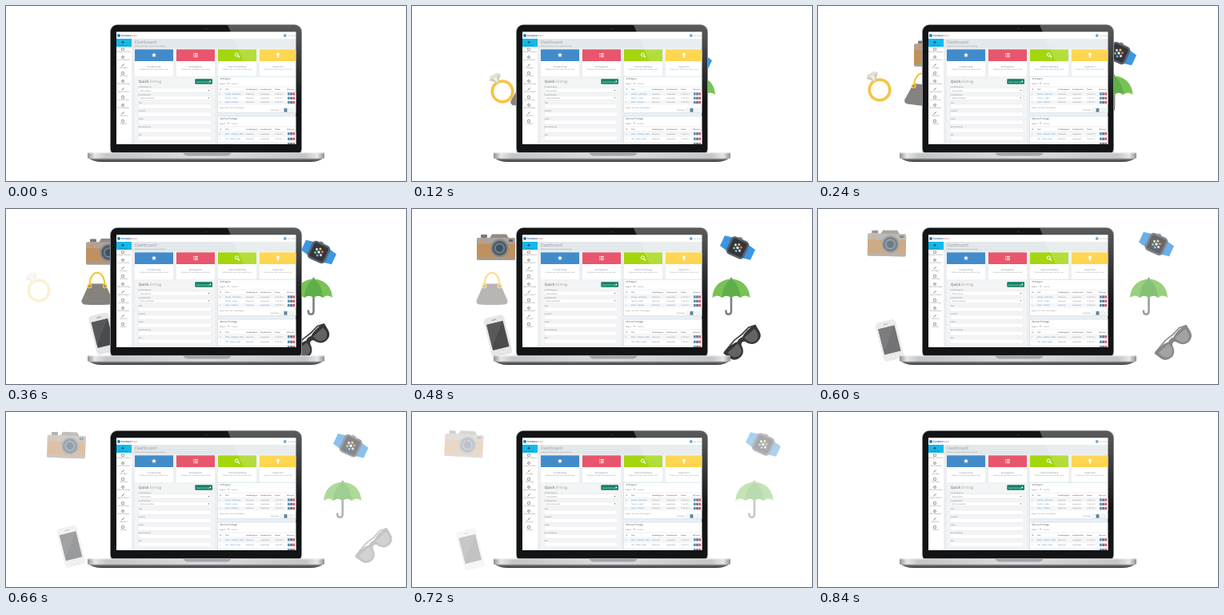
An HTML page that plays this animation: 500x219 px, repeating every 1210 ms.

```html
<!DOCTYPE html>
<html lang="de">
<head>
<meta charset="utf-8">
<title>Dashboard</title>
<style>
html, body { margin: 0; width: 100%; height: 100%; overflow: hidden; background: #fff; }
svg { display: block; width: 100vw; height: 100vh; }
text { font-family: "Open Sans", "Noto Sans", sans-serif; text-rendering: geometricPrecision; }
</style>
</head>
<body>
<svg id="stage" viewBox="0 0 500 219">
  <defs>
    <linearGradient id="base" x1="0" x2="1" y1="0" y2="0">
      <stop offset="0" stop-color="#8d8f92"/>
      <stop offset=".03" stop-color="#e6e7e8"/>
      <stop offset=".08" stop-color="#c3c5c7"/>
      <stop offset=".5" stop-color="#dcdddf"/>
      <stop offset=".92" stop-color="#c3c5c7"/>
      <stop offset=".97" stop-color="#e6e7e8"/>
      <stop offset="1" stop-color="#8d8f92"/>
    </linearGradient>
    <linearGradient id="foot" x1="0" x2="0" y1="0" y2="1">
      <stop offset="0" stop-color="#a2a4a7"/>
      <stop offset="1" stop-color="#2d2e30"/>
    </linearGradient>
    <linearGradient id="gloss" x1="0" x2="0" y1="0" y2="1">
      <stop offset="0" stop-color="#fff" stop-opacity=".3"/>
      <stop offset=".6" stop-color="#fff" stop-opacity="0"/>
    </linearGradient>
    <clipPath id="screen"><path d="M138 32.5H362.3V173H138Z"/></clipPath>
  </defs>
  <g id="items"></g>
  <g id="laptop"></g>
</svg>
<script>
const STEP = 30, LAST = 840, LOOP = 1210;

const rect = (x, y, w, h, fill, more = "") =>
  `<rect x="${x}" y="${y}" width="${w}" height="${h}" fill="${fill}" ${more}/>`;
const disc = (x, y, r, fill, more = "") =>
  `<circle cx="${x}" cy="${y}" r="${r}" fill="${fill}" ${more}/>`;
const path = (d, fill, more = "") => `<path d="${d}" fill="${fill}" ${more}/>`;
const line = (d, stroke, width, more = "") =>
  path(d, "none", `stroke="${stroke}" stroke-width="${width}" ${more}`);
const label = (x, y, size, fill, str, more = "") =>
  `<text x="${x}" y="${y}" font-size="${size}" fill="${fill}" ${more}>${str}</text>`;
const MID = 'text-anchor="middle"';
const SEMI = 'font-weight="600"';
const LIGHT = 'font-weight="300"';

function watchDots() {
  const colors = ["#f0c74a", "#e46a63", "#d9dde1", "#58b6ea", "#72c26b", "#d9dde1"];
  return disc(0, 0, 1.7, "#fff") + colors.map((c, i) => {
    const a = i * Math.PI / 3;
    return disc(4.4 * Math.cos(a), 4.4 * Math.sin(a), 1.5, c);
  }).join("");
}

const art = {
  ring: () =>
    disc(0, 0, 12.8, "none", 'stroke="#f6c344" stroke-width="3.6"') +
    path("M-8 -20L-5 -24H5L8 -20L0 -12Z", "#e3e1d6") +
    path("M-8 -20H8L0 -12Z", "#cfcabb") +
    path("M-3 -20H3L0 -12Z", "#efeee8"),

  bag: () =>
    path("M-8 -6H8Q10 -6 11 -4L19.5 15Q20 19 16 20Q0 21 -16 20Q-20 19 -19.5 15L-11 -4Q-10 -6 -8 -6Z", "#85827f") +
    line("M-9.5 -4C-9 -25 9 -25 9.5 -4", "#f3c536", 2.1) +
    [-9.5, 9.5].map(x => disc(x, -3, 2.2, "none", 'stroke="#f3c536" stroke-width="1.5"')).join(""),

  camera: () =>
    rect(-19, -15.5, 8, 4, "#75777a", 'rx="1"') +
    path("M-8 -11L-5 -16H13L16 -11Z", "#8f8a85") +
    rect(-24, -11.5, 48, 28, "#c0915f", 'rx="2"') +
    path("M-24 -4V-9.5Q-24 -11.5 -22 -11.5H22Q24 -11.5 24 -9.5V-4Z", "#aba49d") +
    rect(-24, 13, 48, 3.5, "#a59b91", 'rx="1.5"') +
    disc(-17, -7.5, 1.8, "#ef8b3b") +
    rect(16, -9.5, 5, 3, "#5f666c") +
    disc(4.5, 1.5, 11.2, "#858a8f") +
    disc(4.5, 1.5, 9.2, "#4f5a64") +
    disc(4.5, 1.5, 6.6, "#6d8190") +
    disc(4.5, 1.5, 4.6, "#40525f"),

  phone: () =>
    rect(-13, -25, 26, 50, "#e6e6e7", 'rx="4.5"') +
    rect(-10.5, -17, 21, 33, "#4a4b4d") +
    path("M-10.5 -17H10.5L-10.5 12Z", "#58595b") +
    rect(-3, -21.5, 6, 1.2, "#a5a6a8", 'rx=".6"') +
    disc(0, 20.5, 2, "#fff", 'stroke="#bfc0c2" stroke-width=".7"'),

  watch: () =>
    path("M-7 -21H7L9.5 -9H-9.5Z", "#3b97e3") +
    path("M-9.5 9H9.5L7 21H-7Z", "#3b97e3") +
    rect(-12, -12, 24, 24, "#5b6067", 'rx="5"') +
    rect(-9.5, -9.5, 19, 19, "#33373d", 'rx="2.5"') +
    rect(11.5, -4, 2, 5, "#777d86", 'rx="1"') +
    watchDots(),

  umbrella: () =>
    line("M0 -22V18.5Q0 22.7 -3.4 22.7Q-6.6 22.7 -6.6 18.5", "#7d8082", 2.6, 'stroke-linecap="round"') +
    path("M-23.5 2C-22 -29 22 -29 23.5 2Q17.5 -3 11.5 2Q6 -3 0 2Q-6 -3 -11.5 2Q-17.5 -3 -23.5 2Z", "#78c256") +
    path("M0 -21.3C-7 -17 -11 -9 -11.5 2Q-6 -3 0 2Q6 -3 11.5 2C11 -9 7 -17 0 -21.3Z", "#5fae49"),

  glasses: () =>
    line("M-25 -8L-6 -11L8 -10M25 -8L18 -11L4 -10", "#48494b", 1.8, 'stroke-linecap="round"') +
    path("M-27 -8Q-14 -11 -4 -7Q0 -9 4 -7Q14 -11 27 -8L25 2Q23 10 14 10Q6 10 3 -1Q0 -4 -3 -1Q-6 10 -14 10Q-23 10 -25 2Z", "#343537") +
    [-14, 14].map(x => path(`M${x - 8.5} -5H${x + 8.5}Q${x + 8.5} 7.5 ${x} 7.5Q${x - 8.5} 7.5 ${x - 8.5} -5Z`, "#626365")).join("")
};

// keys: time, x, y, angle; fade: start, end
const items = [
  { art: "glasses", fade: [520, 715], keys: [[0, 300, 165, -42], [240, 344, 165.5, -42], [360, 383, 167, -42], [480, 414.5, 168.5, -42], [720, 477, 169, -42]] },
  { art: "umbrella", fade: [510, 880], keys: [[0, 341, 109, 0], [840, 442.5, 109, 0]] },
  { art: "watch", fade: [510, 880], keys: [[0, 330, 72, -65], [240, 376, 59, -65], [360, 391, 54, -65], [480, 407, 48.5, -65], [600, 423, 44, -65], [840, 455, 37, -65]] },
  { art: "phone", fade: [540, 810], keys: [[0, 190, 150, -14], [240, 152, 153, -14], [360, 121, 156, -14], [480, 107.5, 159, -14], [600, 89.5, 164.5, -14], [720, 73, 172, -14], [840, 57, 174, -14]] },
  { art: "bag", fade: [400, 590], keys: [[0, 160, 108, 8], [240, 129, 104, 5], [360, 114, 99.5, 0], [600, 86, 99.5, 0]] },
  { art: "camera", fade: [530, 820], keys: [[0, 184, 72, 0], [240, 144, 59, 0], [360, 124, 53, 0], [480, 105, 47.5, 0], [600, 86, 42.5, 1], [720, 65, 39.5, 3], [840, 46, 36, 4]] },
  { art: "ring", fade: [250, 395], keys: [[0, 149, 109, -28], [240, 77, 105, -28], [360, 41, 102, -28], [390, 32, 101, -28]] }
];

function fields() {
  const rows = [["Fundkategorie", "Bitte wählen", 102], ["Fundstandort", "Bitte auswählen", 111.5],
    ["Titel", "", 122], ["Fundort", "", 132], ["Farbe", "", 142], ["Beschreibung", "", 152], ["Zeit", "", 162]];
  return rows.map(([name, value, y]) =>
    label(165.5, y, 2.4, "#777", name) +
    rect(165.5, y + 1, 91, 5.2, "#fff", 'stroke="#dfe1e4" stroke-width=".4"') +
    (value ? label(168, y + 4.6, 2.3, "#777", value) + path(`M252.5 ${y + 3}h2l-1 1.3Z`, "#555") : "")
  ).join("");
}

function table(y, height, head, gap, rows) {
  const cols = [267, 274, 300, 318, 336, 351];
  const put = (cells, at, fill, more) =>
    cells.map((c, i) => label(cols[i], at, 2.1, fill, c, more)).join("");
  let s = rect(264.5, y, 98, height, "#fff", 'stroke="#cfe2ec" stroke-width=".8"') +
    label(267.5, y + 4.2, 3.1, "#555", head) +
    label(267, y + 9.6, 2.2, "#666", "Zeige 5") + path(`M277 ${y + 8.3}h2l-1 1.3Z`, "#666") +
    label(282, y + 9.6, 2.2, "#777", "Suchen") +
    line(`M265 ${y + 13}H363M265 ${y + 19}H363`, "#dcdfe2", .5) +
    put(["ID", "Titel", "Fundkategorie", "Fundstandort", "Datum", "Aktionen"], y + 16.6, "#555", SEMI);
  rows.forEach((title, i) => {
    const at = y + 22.6 + i * gap;
    s += rect(265, at - 3.2, 98, gap, i % 2 ? "#fff" : "#f4f6f8") +
      put([8 - i, "", "Elektronik", "Hauptstelle", "12.08.2015"], at, "#777", "") +
      label(cols[1], at, 2.3, "#3f86c4", title) +
      ["#4b8ec8", "#6b7078", "#d9536a"].map((c, n) => rect(352 + n * 3.2, at - 2.4, 2.7, 3.2, c)).join("");
  });
  return s;
}

function card(x, w, color, icon, title) {
  const mid = x + w / 2;
  return rect(x, 54.3, w, 34, "#fff") + rect(x, 54.3, w, 14.7, color) +
    `<g transform="translate(${mid} 61.5)">${icon}</g>` +
    label(mid, 76.8, 3, "#7b8ca0", title, MID) +
    label(mid, 80.4, 2.2, "#888", "Erfassen Sie hier einen neuen Fund", MID);
}

function menu() {
  const names = ["Anfrage erfassen", "Fund erfassen", "Anfragen", "Meldung", "Meine Einträge",
    "Export/Import", "Auswertung", "Einstellungen", "Benutzer", "Support"];
  return names.map((name, i) => {
    const y = 54 + i * 10;
    const icon = [rect(144.7, y - 1.3, 2.6, 2.6, "none", 'stroke="#777" stroke-width=".7"'),
      disc(146, y, 1.4, "none", 'stroke="#777" stroke-width=".8"'),
      line(`M144.5 ${y + 1.4}L147.5 ${y - 1.5}`, "#777", 1)][i % 3];
    return icon + label(147, y + 4.2, 2.3, "#777", name, MID);
  }).join("");
}

function star(r) {
  let d = "";
  for (let i = 0; i < 10; i++) {
    const a = Math.PI * (i / 5 - .5), q = i % 2 ? r * .45 : r;
    d += (i ? "L" : "M") + (q * Math.cos(a)).toFixed(2) + " " + (q * Math.sin(a)).toFixed(2);
  }
  return path(d + "Z", "#fff");
}

function screen() {
  const list = [-2, 0, 2].map(y => rect(-2.8, y - .5, 1, 1, "#fff") + rect(-1.2, y - .5, 4, 1, "#fff")).join("");
  const lens = disc(-.6, -.6, 2, "none", 'stroke="#fff" stroke-width="1"') + line("M1 1L3 3", "#fff", 1.2);
  const bulb = disc(0, -1, 1.9, "#fff") + rect(-.9, .4, 1.8, 2.8, "#fff");
  const pages = [343, 347.5, 352, 356.5].map((x, i) =>
    rect(x, 128, 4, 4.8, i === 1 ? "#4a7896" : "#fff", 'stroke="#d4d8dc" stroke-width=".4"') +
    label(x + 2, 131.3, 2.3, i === 1 ? "#fff" : "#428bca", i + 1, MID)).join("");
  return rect(138, 32, 225, 142, "#eceff1") +
    rect(138, 32, 225, 9, "#fff") + rect(157, 41, 206, 12, "#e3e8ea") +
    disc(141, 37, 2, "#1d7fc1") +
    label(144, 38.1, 2.9, "#1b568c", `<tspan font-weight="700">Fundara</tspan><tspan fill="#c4616d">Depot</tspan>`) +
    disc(348.8, 37, 1.9, "#3f8fd0") + label(352, 38, 2.3, "#4a7fae", "Ina Probst") +
    rect(138, 41, 19, 132, "#fff") + rect(138, 41, 19, 10, "#14b9eb") +
    path("M144 45.4L146 43.4L148 45.4H147.3V46.6H144.7V45.4Z", "#24546b") +
    label(146.5, 49.8, 2.1, "#17637f", "Dashboard", MID) + menu() +
    label(161, 47.2, 5.4, "#6b7179", "Dashboard", LIGHT) +
    label(161, 51, 2.2, "#888", "Erfassen Sie hier einen neuen Eintrag") +
    card(161, 48, "#428bca", star(3.2), "Fundeintrag") +
    card(213, 48, "#e8566d", list, "Anfrageliste") +
    card(265, 48, "#a3d60f", lens, "Verlustmeldung") +
    card(317, 46, "#ffcd2b", bulb, "Abgeholte") +
    rect(161, 89.5, 100, 84, "#f3f4f5") +
    label(165.8, 95.6, 4.6, "#777", `<tspan font-weight="600">Quick</tspan> Eintrag`, LIGHT) +
    rect(236.3, 91.2, 21.7, 6.6, "#128066", 'rx=".8"') +
    label(246, 95.5, 2.6, "#fff", "Quick Eintrag", MID) + disc(255.3, 94.5, 1, "#fff") +
    fields() +
    table(88.2, 45.6, "Anfragen", 5.3, ["Handy - Gefunden", "Tasche - Leder", "Jacke - Schwarz"]) +
    label(267, 128, 2.2, "#777", "Zeige 1 bis 3 von 12 Einträgen") +
    label(331, 131.3, 2.2, "#777", "Vorherige") + pages +
    table(138, 40, "Meine Einträge", 6.5, ["Brille - Schwarz, Silber", "Uhr - Silber, Leder", "Ring - Gold"]);
}

function laptop() {
  return rect(130, 23, 240, 165, "#a9abad", 'rx="9"') +
    rect(130.8, 23.8, 238.4, 163, "#131416", 'rx="8.4"') +
    disc(250.5, 28.5, .8, "#41464c") +
    `<g clip-path="url(#screen)">${screen()}</g>` +
    path("M277 23.8H361Q369.2 24 369.2 32V183H347Z", "url(#gloss)") +
    path("M103 190H397Q392 195 380 195H120Q108 195 103 190Z", "url(#foot)") +
    rect(102, 183.6, 296, 7.2, "url(#base)", 'rx="1"') +
    rect(102.5, 183.6, 295, .7, "#f4f4f5") +
    path("M221.5 183.6H281.5Q280.5 187.4 276 187.4H227Q222.5 187.4 221.5 183.6Z", "#a4a6a9");
}

const lerp = (a, b, p) => a + (b - a) * p;

function pose(keys, t) {
  let i = 1;
  while (i < keys.length - 1 && keys[i][0] < t) i++;
  const a = keys[i - 1], b = keys[i];
  const p = Math.min(1, (t - a[0]) / (b[0] - a[0]));
  return [1, 2, 3].map(n => lerp(a[n], b[n], p));
}

document.getElementById("laptop").innerHTML = laptop();
const layer = document.getElementById("items");
layer.innerHTML = items.map(it => `<g>${art[it.art]()}</g>`).join("");

function render(ms) {
  const t = Math.min(LAST, Math.floor((ms % LOOP) / STEP) * STEP);
  items.forEach((it, i) => {
    const [x, y, angle] = pose(it.keys, t);
    const [from, to] = it.fade;
    const alpha = t >= LAST ? 0 : Math.max(0, Math.min(1, (to - t) / (to - from)));
    const node = layer.children[i];
    node.setAttribute("transform", `translate(${x} ${y}) rotate(${angle})`);
    node.setAttribute("opacity", alpha);
  });
}

const start = performance.now();
function tick() {
  render(performance.now() - start);
  requestAnimationFrame(tick);
}
render(0);
requestAnimationFrame(tick);
</script>
</body>
</html>
```
